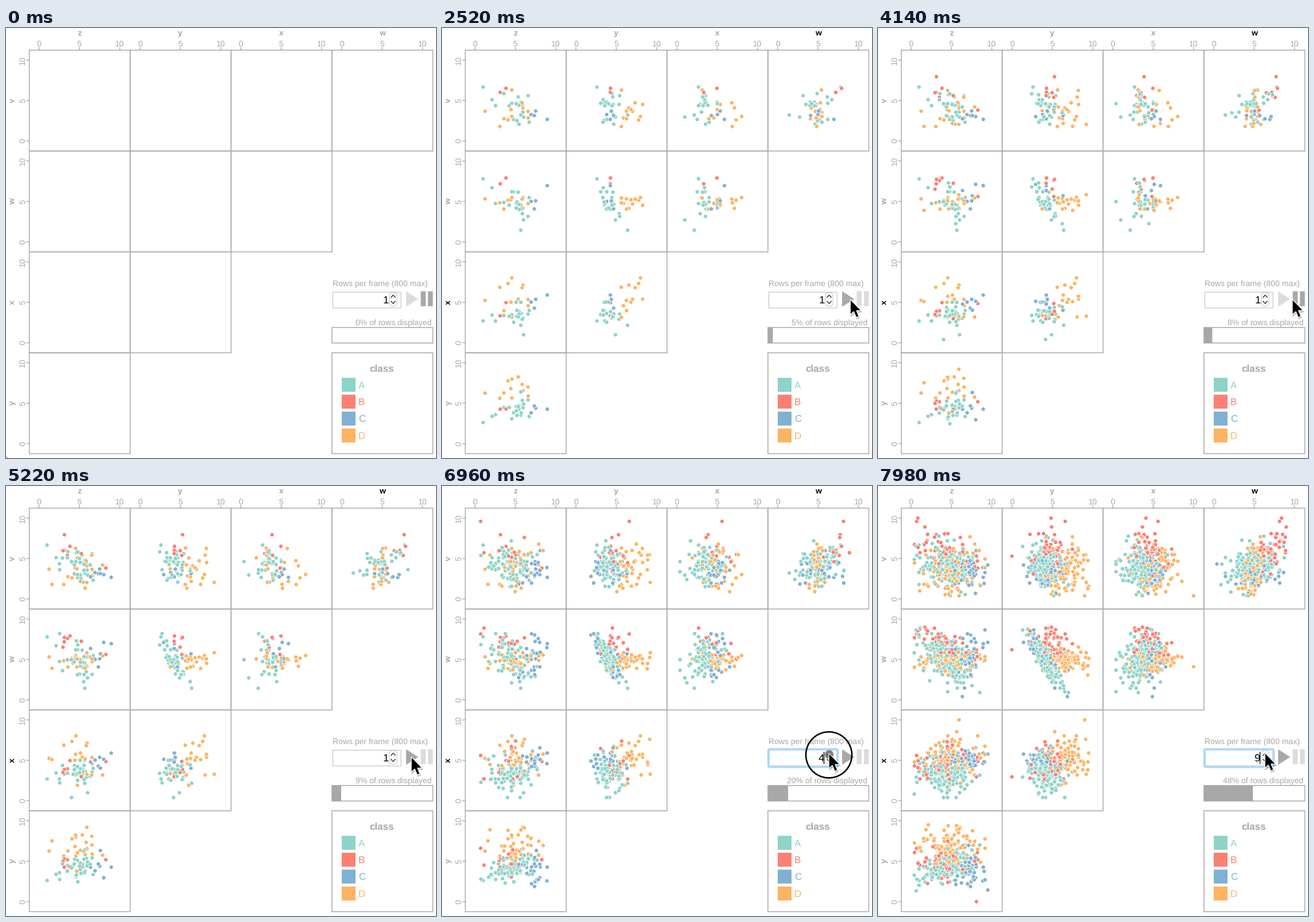
These frames come from a looping animation (748 px wide and 748 px high, 8 s). A matplotlib script:

```python
import numpy as np
import matplotlib.pyplot as plt
from matplotlib.animation import FuncAnimation
from matplotlib.patches import Circle, FancyBboxPatch, Polygon, Rectangle

plt.rcParams.update({"path.snap": False, "text.hinting": "none"})

SIZE, DPI = 748, 100
PT = 72 / DPI
LOOP, STEP, GRID, TICK = 8000, 40, 60, 30
GREY, PALE = "#a8a8a8", "#dcdcdc"
COLORS = {"A": "#8dd3c7", "B": "#fb8072", "C": "#80b1d3", "D": "#fdb462"}
SHARES = [0.42, 0.16, 0.16, 0.26]
VARS = "zyxwv"
CELL, LEFT, TOP, UNIT = 175.5, 40.5, 38.5, 14.06
ZERO_X, ZERO_Y = 57.4, 196.5
TOTAL = 800

PLAY = [(1380, 3330), (5040, LOOP)]
BUMPS = range(6500, 7840, 190)
CLICKS = [(1200, 120), (3180, 150), (4920, 120)] + [(t, 90) for t in BUMPS]
# time, x, y of the pointer tip
PATH = [(600, 790, 650), (1200, 707, 472), (2340, 707, 472), (2940, 722, 472),
        (4080, 722, 472), (4440, 705, 471), (5700, 705, 471), (5940, 678, 470),
        (6060, 678, 470), (6420, 673, 465), (LOOP, 673, 464)]

# mean, spread and shared-factor weight of z, y, x, w, v
CLUSTERS = {
    "A": [(4.6, 4.3, 3.4, 4.8, 4.0), (1.5, 0.9, 1.1, 1.5, 1.3), (-0.5, -0.85, 0.3, 0.95, 0.3)],
    "B": [(4.2, 4.8, 4.6, 7.2, 5.9), (1.8, 1.1, 1.2, 1.1, 1.4), (-0.85, 0, -0.6, 0.9, 0.6)],
    "C": [(7.2, 4.1, 4.8, 5.2, 3.4), (0.9, 1.1, 0.6, 1.7, 1.0), (0.5, -0.8, 0, 0.95, 0.2)],
    "D": [(4.9, 6.7, 5.3, 4.8, 3.4), (1.8, 1.4, 1.3, 0.7, 1.6), (0.3, 0.4, 0.4, 0.4, 0.5)],
}
# rows that stand apart from the clusters
OUTLIERS = {0: ("D", (5.93, 6.55, 7.13, 4.15, 4.09)),
            80: ("B", (0.7, 6.6, 5.6, 8.15, 9.6)),
            260: ("D", (5.95, 9.0, 10.0, 4.1, 0.4)),
            300: ("B", (0.85, 4.85, 4.1, 8.4, 10.0)),
            340: ("B", (8.1, 0.0, 2.95, 6.2, 5.3))}

rng = np.random.default_rng(11)


def make_row(i):
    if i in OUTLIERS:
        return OUTLIERS[i]
    name = rng.choice(list(COLORS), p=SHARES)
    mean, spread, weight = map(np.array, CLUSTERS[name])
    noise = np.sqrt(1 - weight ** 2) * rng.normal(size=len(VARS))
    return name, np.clip(mean + spread * (weight * rng.normal() + noise), 0.4, 9.5)


def step_value(t):
    return 1 + sum(t >= b for b in BUMPS)


def row_count(t):
    return sum(step_value(tick) for start, end in PLAY
               for tick in range(start, min(t, end) + 1, TICK))


def pointer(t):
    for (t0, x0, y0), (t1, x1, y1) in zip(PATH, PATH[1:]):
        if t0 <= t < t1:
            u = (t - t0) / (t1 - t0)
            u = u * u * (3 - 2 * u)
            return x0 + (x1 - x0) * u, y0 + (y1 - y0) * u
    return None


fig = plt.figure(figsize=(SIZE / 100, SIZE / 100), dpi=DPI, facecolor="white")
ax = fig.add_axes([0, 0, 1, 1])
ax.set(xlim=(0, SIZE), ylim=(SIZE, 0))
ax.axis("off")


def text(x, y, s, px=14, color=GREY, ha="center", bold=False, rot=0):
    return ax.text(x, y, s, fontsize=px * PT, color=color, ha=ha, va="baseline",
                   rotation=rot, rotation_mode="anchor", family="Liberation Sans",
                   weight="bold" if bold else "normal", zorder=4)


def box(x0, y0, x1, y1, fc="none", ec="none", lw=1.5):
    return ax.add_patch(Rectangle((x0, y0), x1 - x0, y1 - y0, fc=fc, ec=ec,
                                  lw=lw * PT, zorder=2))


def rounded(x0, y0, x1, y1, r, fc, ec, lw, z):
    return ax.add_patch(FancyBboxPatch((x0, y0), x1 - x0, y1 - y0,
                                       boxstyle=f"round,pad=0,rounding_size={r}",
                                       fc=fc, ec=ec, lw=lw * PT, zorder=z))


def line(xs, ys, color=GREY, lw=1.4, z=2):
    return ax.plot(xs, ys, color=color, lw=lw * PT, zorder=z)[0]


# panels and axes
cells = [(r, c) for r in range(4) for c in range(4 - r)]
for r, c in cells:
    x, y = LEFT + c * CELL, TOP + r * CELL
    box(x, y, x + CELL, y + CELL, ec=GREY)

col_titles, row_titles = {}, {}
for k in range(4):
    shift = k * CELL
    for value in (0, 5, 10):
        x = ZERO_X + shift + value * UNIT
        y = ZERO_Y + shift - value * UNIT
        line([x, x], [34, TOP])
        line([36, LEFT], [y, y])
        text(x, 31.5, str(value))
        text(33, y, str(value), rot=90)
    col_titles[VARS[k]] = text(127.5 + shift, 13, VARS[k], bold=True)
    row_titles[VARS[4 - k]] = text(15, 126 + shift, VARS[4 - k], bold=True, rot=90)

# points: each row appears once in all ten panels
rows = [make_row(i) for i in range(TOTAL // 2)]
points = np.array([(ZERO_X + c * CELL + UNIT * v[c], ZERO_Y + r * CELL - UNIT * v[4 - r])
                   for _, v in rows for r, c in cells])
face = [COLORS[name] for name, _ in rows for _ in cells]
dots = ax.scatter(points[:, 0], points[:, 1], s=(7.1 * PT) ** 2, c=face,
                  edgecolors="white", linewidths=0.8 * PT, zorder=3)

# controls
text(568, 449, "Rows per frame (800 max)", ha="left")
box(568.5, 459.5, 687, 487, fc="white", ec="#b8b8b8", lw=1)
focus = rounded(568, 458, 688, 488.5, 2, "none", "#b0d8f3", 4.2, 3)
number = text(661, 479, "1", px=18.5, color="black")
caret = line([664.5, 664.5], [463, 483], "black", 1.3, 4)
rounded(667, 460, 680, 484, 6.4, "white", "#c4c4c4", 1, 4)
pressed = ax.add_patch(Circle((673.5, 467), 7.5, fc="#808080", zorder=4))
for tip, base in ((464.5, 468.5), (479.5, 475.5)):
    line([670, 673.5, 677], [base, tip, base], "#444444", 1.6, 5)
play = ax.add_patch(Polygon([(696, 458), (696, 485), (717, 471.5)], lw=0, zorder=2))
bars = [box(x, 458, x + 8.5, 484, lw=0) for x in (721.5, 734)]

label = text(740.5, 517, "", ha="right")
fill = box(567, 521, 567, 548, fc=GREY)
box(567, 521, 742.5, 548, ec=GREY)

# legend
box(567, 565, 742.5, 740.5, ec=GREY)
text(654, 598, "class", px=17, bold=True)
for k, (name, color) in enumerate(COLORS.items()):
    y = 608.5 + 29.4 * k
    box(584, y, 608, y + 24.3, fc=color, lw=0)
    text(613, y + 18.3, name, px=17, color=color, ha="left")

# pointer
ARROW = np.array([(0, 0), (0, 27), (6, 21.3), (10.3, 31.5), (15, 29.5),
                  (10.8, 19.6), (19, 19.6)])
shadow = ax.add_patch(Polygon(ARROW, fc="black", lw=2 * PT, ec="black", alpha=0.16, zorder=8))
arrow = ax.add_patch(Polygon(ARROW, fc="black", ec="white", lw=1.3 * PT, zorder=9))
ring = ax.add_patch(Circle((0, 0), 40, fc="none", ec="black", lw=2.6 * PT, zorder=10))


def update(i):
    t = (i * STEP + STEP // 2) // GRID * GRID
    n = row_count(t)
    dots.set_offsets(points[:n * len(cells)])
    label.set_text(f"{round(100 * n / TOTAL)}% of rows displayed")
    fill.set_width(CELL * n / TOTAL)

    playing = any(a - TICK <= t < b for a, b in PLAY)
    play.set_facecolor(GREY if playing else PALE)
    for bar in bars:
        bar.set_facecolor(PALE if playing else GREY)

    focused = t >= BUMPS[0]
    focus.set_visible(focused)
    caret.set_visible(focused)
    number.set_text(str(step_value(t)))
    number.set_x(659.5 if focused else 661)

    tip = pointer(t)
    clicking = any(a <= t < a + d for a, d in CLICKS)
    pressed.set_visible(clicking and focused)
    ring.set_visible(clicking)
    for part in (arrow, shadow):
        part.set_visible(tip is not None)
    hot_col = hot_row = None
    if tip is not None:
        arrow.set_xy(ARROW + tip)
        shadow.set_xy(ARROW + tip + (1, 2.5))
        ring.center = (tip[0], tip[1] + 3)
        if tip[0] < SIZE:
            hot_col = "w"
            hot_row = "y" if tip[1] > 565 else "x"
    for titles, hot in ((col_titles, hot_col), (row_titles, hot_row)):
        for name, title in titles.items():
            title.set_color("black" if name == hot else GREY)
    return []


anim = FuncAnimation(fig, update, frames=LOOP // STEP, interval=STEP,
                     init_func=lambda: update(0), repeat=True, repeat_delay=0)
plt.show()
```
